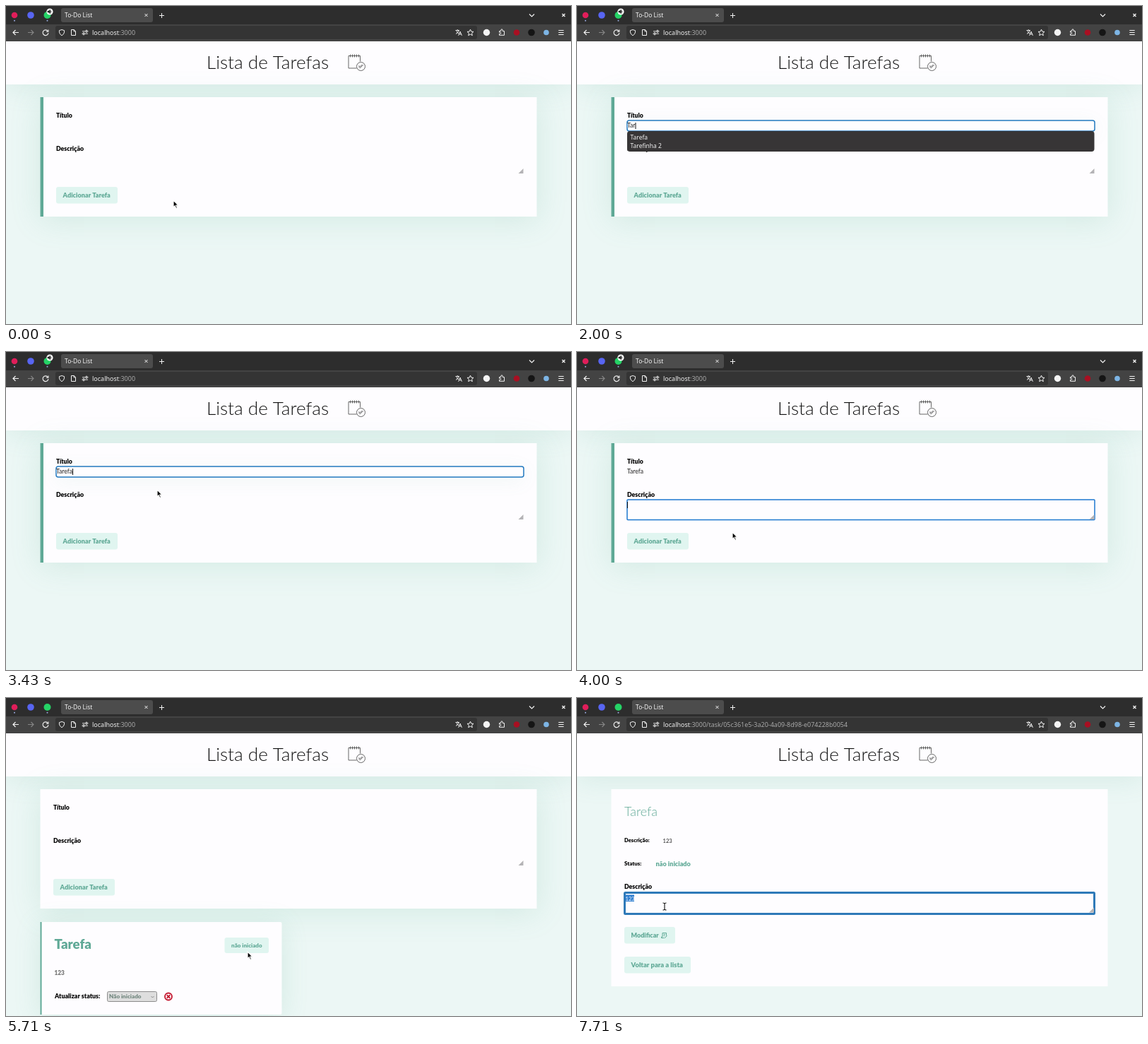
Animation, 800 px wide and 450 px high, one loop 8 s. Source, as an HTML page with a canvas:

```html
<!DOCTYPE html>
<html lang="pt">
<head>
<meta charset="utf-8">
<title>To-Do List</title>
<style>
html, body { margin: 0; width: 100%; height: 100%; overflow: hidden; background: #ecf7f5 }
canvas { display: block }
</style>
</head>
<body>
<canvas id="stage" width="800" height="450"></canvas>
<script>
const ctx = document.getElementById('stage').getContext('2d');
const LOOP = 8000;
const TEAL = '#5fa996', MINT = '#e0f5f0', PAPER = '#fefdff', INK = '#000', LIGHT = '#f2f2f2';
const HOST = 'localhost', PORT = ':3000', TASK = '/task/05c361e5-3a20-4a09-8d98-e074228b0054';

// Each row holds from its time until the next one.
const POINTER = [
  [0, 'arrow', 237, 275], [140, 'arrow', 230, 238], [290, 'arrow', 221, 192], [430, 'beam', 214, 170],
  [1290, 'none'],
  [3290, 'beam', 211, 171], [3430, 'arrow', 214, 195], [3570, 'beam', 217, 223], [4000, 'arrow', 220, 255],
  [4140, 'none'],
  [4710, 'arrow', 200, 259], [4860, 'hand', 150, 267], [5000, 'hand', 132, 268], [5290, 'hand', 140, 268],
  [5430, 'arrow', 210, 302], [5570, 'arrow', 300, 345], [5710, 'arrow', 342, 359], [5860, 'arrow', 305, 357],
  [6000, 'arrow', 264, 356], [6140, 'arrow', 228, 355], [6290, 'arrow', 180, 354], [6430, 'arrow', 138, 353],
  [6570, 'hand', 105, 353], [6710, 'hand', 101, 352], [7140, 'arrow', 101, 353],
  [7430, 'arrow', 112, 330], [7570, 'beam', 122, 297], [7710, 'beam', 124, 295]
];
const TITLE = [[0, ''], [1290, 'T'], [1430, 'Ta'], [1710, 'Tar'], [2710, 'Tare'], [2860, 'Taref'], [3000, 'Tarefa'], [5140, '']];
const DETAILS = [[0, ''], [4140, '1'], [4290, '12'], [4430, '123'], [5140, '']];

const at = (rows, t) => rows.findLast(row => row[0] <= t);
const between = (t, from, to) => t >= from && t < to;

function text(str, x, y, size, color = INK, weight = 900, family = 'Lato') {
  ctx.font = `${weight} ${size}px ${family}, sans-serif`;
  ctx.fillStyle = color;
  ctx.fillText(str, x, y);
  return x + ctx.measureText(str).width;
}
const uiText = (str, x, y, size, color = LIGHT) => text(str, x, y, size, color, 400, '"Noto Sans"');

function box(x, y, w, h, fill, radius = 0, stroke, width = 1) {
  ctx.beginPath();
  ctx.roundRect(x, y, w, h, radius);
  if (fill) { ctx.fillStyle = fill; ctx.fill(); }
  if (stroke) { ctx.strokeStyle = stroke; ctx.lineWidth = width; ctx.stroke(); }
}
function shadowBox(x, y, w, h, blur, dy, alpha, radius = 0) {
  ctx.save();
  ctx.shadowColor = `rgba(95,175,152,${alpha})`;
  ctx.shadowBlur = blur;
  ctx.shadowOffsetY = dy;
  box(x, y, w, h, PAPER, radius);
  ctx.restore();
}
function dot(x, y, r, color) {
  ctx.beginPath();
  ctx.arc(x, y, r, 0, 7);
  ctx.fillStyle = color;
  ctx.fill();
}
function draw(d, x, y, stroke, width = 1, fill) {
  const path = new Path2D(d);
  ctx.save();
  ctx.translate(x, y);
  if (fill) { ctx.fillStyle = fill; ctx.fill(path); }
  if (stroke) { ctx.strokeStyle = stroke; ctx.lineWidth = width; ctx.stroke(path); }
  ctx.restore();
}
function button(label, x, y, w, size = 9.1, h = 23.5) {
  box(x, y, w, h, MINT, 3);
  text(label, x + 9.6, y + h / 2 + 2.8, size, TEAL);
}
const grip = (x, y) => draw('M0 -7V0H-7Z', x, y, null, 0, '#b4b3b6');
const caret = (x, y) => box(x + .5, y, 1, 9, '#111');

function browser(t) {
  box(0, 0, 800, 26, '#2d2d2d');
  box(0, 26, 800, 24, '#434343');
  box(78, 3, 130, 20, '#4c4c4c', 3);
  dot(12, 13, 4.3, '#e01e5a');
  dot(35, 13, 4.8, '#5865f2');
  dot(58.5, 13, 5, '#25d366');
  dot(12, 20.7, 1, '#9ad');
  dot(58.5, 20.7, 1, '#9ad');
  if (t < 4430) {
    dot(62, 8, 4.6, '#fff');
    draw('M-3 -1H-1.5L.5 -2.8V2.8L-1.5 1H-3ZM1.4 -1.5Q2.8 0 1.4 1.5', 62, 8, '#222', .6, '#222');
  }
  uiText('To-Do List', 83, 16, 8.5);
  draw('M-2 -2L2 2M2 -2L-2 2', 198.5, 13, LIGHT);
  draw('M-3.5 0H3.5M0 -3.5V3.5', 220.5, 13.5, LIGHT);
  draw('M-3.5 -1.5L0 2L3.5 -1.5', 744.5, 13, LIGHT, 1.2);
  draw('M-2 -2L2 2M2 -2L-2 2', 789.5, 13, LIGHT, 1.4);

  draw('M4 0H-4M-.5 -3.5L-4 0L-.5 3.5', 14, 37.5, LIGHT, 1.2);
  draw('M-4 0H4M.5 -3.5L4 0L.5 3.5', 35, 37.5, '#858585', 1.1);
  draw('M3.2 -2A3.9 3.9 0 1 0 3.9 .6M3.9 -4V-1.2H1', 56, 37.5, LIGHT, 1.1);
  box(70, 28, 597, 19, '#343434', 3);
  draw('M0 -4L3.6 -2.8Q4 2 0 4.2Q-4 2 -3.6 -2.8Z', 79, 37.5, LIGHT);
  draw('M-3 -4H.8L3 -1.8V4H-3ZM.6 -4V-1.6H3', 95.5, 37.5, LIGHT);
  draw('M-4 -1.7H1M4 1.7H-1M3 -1.7H4.5M-3 1.7H-4.5M1.2 -3.2H2.8V-.3H1.2ZM-1.2 .3H-2.8V3.2H-1.2Z', 112, 37.5, LIGHT, .9);
  const hostEnd = uiText(HOST, 122, 41, 9);
  uiText(PORT + (t >= 7000 ? TASK : ''), hostEnd, 41, 9, '#a9a9a9');

  draw('M-4.5 -3H1M-1.7 -4.3V-3M-4 2Q-.5 .5 0 -3M-3.2 -2Q-2 .5 0 1.2M-.4 4.3L2 -1.4L4.4 4.3M.5 2.3H3.5', 641, 37.5, LIGHT);
  draw('M0 -4.4L1.3 -1.4L4.5 -1.1L2.1 1L2.8 4.2L0 2.5L-2.8 4.2L-2.1 1L-4.5 -1.1L-1.3 -1.4Z', 657.5, 37.5, LIGHT);
  dot(680.5, 37.5, 4.7, '#f4f4f4');
  draw('M-3.5 -2H-1.2V-3.4A1.2 1.2 0 0 1 1.2 -3.4V-2H3.5V3.8H-3.5V1.9H-2.3A1 1 0 0 0 -2.3 -.2H-3.5Z', 702, 37.5, LIGHT);
  dot(723, 37.5, 4.3, '#a80f22');
  dot(744, 37.5, 4.8, '#151515');
  dot(765, 37.5, 3.8, '#7db5e5');
  draw('M-3.7 -3H3.7M-3.7 0H3.7M-3.7 3H3.7', 786, 37.5, LIGHT);
}

function header() {
  shadowBox(0, 50, 800, 61, 36, 5, .15);
  text('Lista de Tarefas', 284, 88.5, 26.1, '#111', 300);
  const line = '#555';
  draw('M12 20.5H.5V3H17V11M3 1V5M6 1V5M9 1V5M12 1V5M15 1V5', 484.5, 67.5, line, .9);
  draw('M6 0A6 6 0 1 1 -6 0A6 6 0 1 1 6 0M-3.3 .2L-1.2 2.2L3.2 -2.2M-3 -1.2L-1.2 .5L1.8 -2.6', 502.5, 85.5, line, .9, PAPER);
}

function form(t) {
  const hovered = t < 5430, x = hovered ? 71 : 67;
  const title = at(TITLE, t)[1], details = at(DETAILS, t)[1];
  shadowBox(48.5, 129, 703, 169, 40, 5, .18);
  if (hovered) box(48.5, 129, 4.5, 169, TEAL);
  text('Título', x, 157.5, 8.7);
  text('Descrição', x, 204.5, 8.75);

  const titleFocus = between(t, 430, 3570), detailFocus = between(t, 3570, 5140);
  if (titleFocus) {
    shadowBox(71, 162, 662, 15, 26, 5, .1, 3);
    box(71, 162, 662, 15, PAPER, 3, '#237ac0', 1.5);
  }
  if (detailFocus) box(71, 209, 662, 28.5, PAPER, 1, '#1e78cf', 1.5);
  const titleEnd = text(title, 71, 171.8, 8.6, '#222', 400);
  if (titleFocus) caret(titleEnd - .5, 165);
  const detailEnd = text(details, 71, 219.5, 8.4, '#222', 400);
  if (detailFocus) caret(detailEnd - .5, 212);
  grip(732.5, 237);
  button('Adicionar Tarefa', x, 256, 87);

  if (between(t, 2000, 3000)) {
    box(71, 177, 661.5, 29, '#373536', 4);
    uiText('Tarefa', 75.5, 188.6, 8.5);
    uiText('Tarefinha 2', 75.5, 200.6, 8.5);
  }
}

function taskCard() {
  shadowBox(48.5, 317, 342, 131, 36, 5, .18, 2);
  box(48.5, 317, 2, 131, TEAL);
  text('Tarefa', 68.5, 355, 18.7, TEAL);
  button('não iniciado', 309.5, 339, 62.5, 8, 22);
  text('123', 68.5, 392, 8.3, '#777');
  text('Atualizar status:', 69, 425, 8.85);
  box(143.5, 415.5, 70, 14, '#dedede', 2, '#8c8c8c');
  text('Não iniciado', 146, 425.2, 8.1, '#72877f');
  draw('M-2 -1L0 1L2 -1', 207.5, 423, '#777', .8);
  draw('M5 0A5 5 0 1 1 -5 0A5 5 0 1 1 5 0M-2.3 -2.3L2.3 2.3M2.3 -2.3L-2.3 2.3', 230, 422.5, '#c3142d', 1.8);
}

function taskPage(t) {
  box(48.5, 129, 703, 279, PAPER);
  text('Tarefa', 67, 167, 18, TEAL, 300);
  text('Descrição:', 67, 204.3, 7.6);
  text('123', 121.5, 204.8, 7.6, '#222', 400);
  text('Status:', 67, 237.3, 7.9);
  text('não iniciado', 111.5, 237.5, 9.1, TEAL);
  text('Descrição', 67, 270.3, 8.75);
  const selected = t >= 7710;
  if (t >= 7570) box(67.5, 275.5, 665, 30, PAPER, 1, '#2f7ab8', 3);
  if (selected) box(68.5, 278.5, 12.5, 9.5, '#2f7ed0');
  text('123', 68.5, 286.5, 7.6, selected ? '#fff' : '#222', 400);
  grip(732, 303.5);
  button('Modificar', 67, 324, 72, 8.95);
  draw('M-2.5 -3.5H3V.5M-2.5 -3.5V2H-4V3.5H0M-1 -1.5H1.5M-1 .5H1M.5 3.8L4 .5', 123.5, 336, TEAL, 1);
  button('Voltar para a lista', 67, 366, 94, 9.4);
}

function pointer(t) {
  const [, kind, x, y] = at(POINTER, t);
  if (kind === 'arrow') draw('M0 0V9.8L2.2 7.8L3.8 11.5L5.6 10.7L4 7.2H7Z', x, y, '#fff', 1.2, '#000');
  if (kind === 'hand') draw('M-.8 .8Q0 -.2 1 .8V4L5.8 5Q6.8 5.5 6.5 7L5.8 10.5H1.2L-2 6.8Q-2.2 5.5 -.8 6Z', x, y, '#fff', .9, '#000');
  if (kind === 'beam') {
    const d = 'M-2.5 -5Q0 -5 0 -3.5Q0 -5 2.5 -5M0 -4V4M-2.5 5Q0 5 0 3.5Q0 5 2.5 5';
    draw(d, x, y, '#fff', 2.4);
    draw(d, x, y, '#111', 1.1);
  }
}

function render(t) {
  box(0, 0, 800, 450, '#ecf7f5');
  header();
  if (t < 7000) {
    form(t);
    if (t >= 5140) taskCard();
  } else taskPage(t);
  browser(t);
  if (between(t, 6570, 7000)) {
    box(-4, 436, 257.5, 18, '#3b3b3b', 3);
    uiText(HOST + PORT + TASK, 2, 446.5, 8.6);
  }
  pointer(t);
}

const start = performance.now();
function tick() {
  render((performance.now() - start) % LOOP);
  requestAnimationFrame(tick);
}
tick();
</script>
</body>
</html>
```
